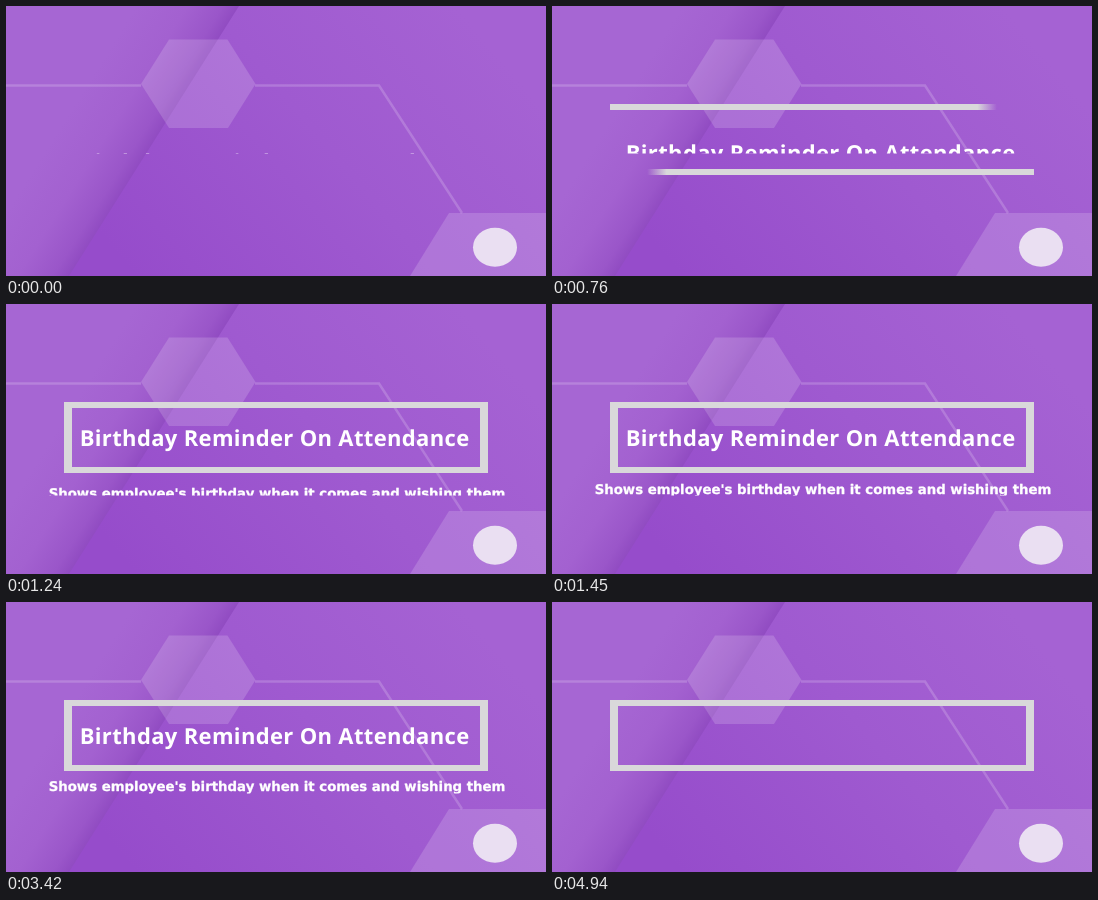
Recreate the animation shown at these times as an HTML page. Size 540x270 px, loop 5 s.

```html
<!DOCTYPE html>
<html lang="en">
<head>
<meta charset="utf-8">
<title>Birthday Reminder On Attendance</title>
<style>
  html, body { margin: 0; width: 100%; height: 100%; overflow: hidden; background: #9f5ad0; }
  svg { display: block; width: 540px; height: 270px; }
  text { font-weight: 700; fill: #fff; text-rendering: geometricPrecision; }
  #title { font-family: "Open Sans", "Noto Sans", sans-serif; font-size: 22px; letter-spacing: .34px; }
  #sub { font-family: "DejaVu Sans", sans-serif; font-size: 13.3px; stroke: #fff; stroke-width: .3; stroke-linejoin: round; }
</style>
</head>
<body>
<svg viewBox="0 0 540 270">
  <defs>
    <linearGradient id="base" gradientUnits="userSpaceOnUse" x1="130" y1="270" x2="450" y2="0">
      <stop offset="0" stop-color="#964ccb"/>
      <stop offset=".55" stop-color="#9f5ad0"/>
      <stop offset="1" stop-color="#a562d3"/>
    </linearGradient>
    <linearGradient id="sheet" gradientUnits="userSpaceOnUse" x1="72" y1="93" x2="145" y2="139">
      <stop offset="0" stop-color="#a666d3"/>
      <stop offset=".5" stop-color="#a361d0"/>
      <stop offset=".85" stop-color="#9a56c9"/>
      <stop offset="1" stop-color="#914cc2"/>
    </linearGradient>
    <linearGradient id="fade">
      <stop offset=".95" stop-color="#d9d8da"/>
      <stop id="tip" offset="1" stop-color="#d9d8da"/>
    </linearGradient>
    <clipPath id="titleClip"><rect x="60" y="110" width="420" height="37.5"/></clipPath>
    <clipPath id="subClip"><rect x="30" y="172" width="490" height="19.5"/></clipPath>
  </defs>

  <rect width="540" height="270" fill="url(#base)"/>
  <path d="M0 0H233L63 270H0Z" fill="url(#sheet)"/>
  <path d="M0 79.5H135M249 79.5H373L456 207" fill="none" stroke="#fff" stroke-opacity=".18" stroke-width="2.5"/>
  <path d="M135 78L163 33.5H221.5L249.5 78L222 122H163Z" fill="#fff" fill-opacity=".16"/>
  <path d="M404 270L443 207H540V270Z" fill="#fff" fill-opacity=".16"/>
  <ellipse cx="489" cy="241.3" rx="22" ry="19.5" fill="#eadff2"/>

  <!-- The other half of the frame is the same pair turned half round -->
  <g id="half">
    <rect id="side" fill="#d9d8da"/>
    <rect id="top" fill="url(#fade)"/>
  </g>
  <use href="#half" transform="rotate(180 270 133.5)"/>

  <g id="words">
    <g clip-path="url(#titleClip)"><text id="title" x="73.7" y="142">Birthday Reminder On Attendance</text></g>
    <g clip-path="url(#subClip)"><text id="sub" x="42.7" y="188.7">Shows employee's birthday when it comes and wishing them</text></g>
  </g>
</svg>
<script>
const LOOP = 5000;
const LEFT = 58, TOP = 98, WIDTH = 424, HEIGHT = 71;
const $ = id => document.getElementById(id);

const span = (t, from, to) => Math.min(1, Math.max(0, (t - from) / (to - from)));
const easeOut = (p, power) => 1 - (1 - p) ** power;

function setBox(id, x0, y0, x1, y1) {
  const box = { x: x0, y: y0, width: Math.max(0, x1 - x0), height: Math.max(0, y1 - y0) };
  for (const key in box) $(id).setAttribute(key, box[key]);
}

const drop = (id, y) => $(id).setAttribute("transform", `translate(0 ${y})`);

function draw(t) {
  // The bars swing apart like a pinwheel before they close the frame
  const swing = Math.sin(Math.PI * span(t, 760, 1240));
  const slide = 14 * (1 - span(t, 400, 760));
  const reach = WIDTH * easeOut(span(t, 360, 1240), 4);
  const x = LEFT + slide + 7 * swing;
  setBox("top", x, TOP, reach ? Math.max(x, LEFT + reach) : x, TOP + 6);
  $("tip").setAttribute("stop-opacity", span(t, 760, 1000));

  const fall = HEIGHT * span(t, 740, 1030);
  const sideX = LEFT + 2 * swing;
  setBox("side", sideX, TOP + 9 * swing, sideX + 8, TOP + fall);

  drop("title", 22 * (1 - easeOut(span(t, 620, 1240), 2)));
  drop("sub", 15 * (1 - easeOut(span(t, 1000, 1600), 2)));
  $("words").setAttribute("opacity", 1 - span(t, 4740, 4940));
}

const start = performance.now();
function tick() {
  draw((performance.now() - start) % LOOP);
  requestAnimationFrame(tick);
}
tick();
</script>
</body>
</html>
```
